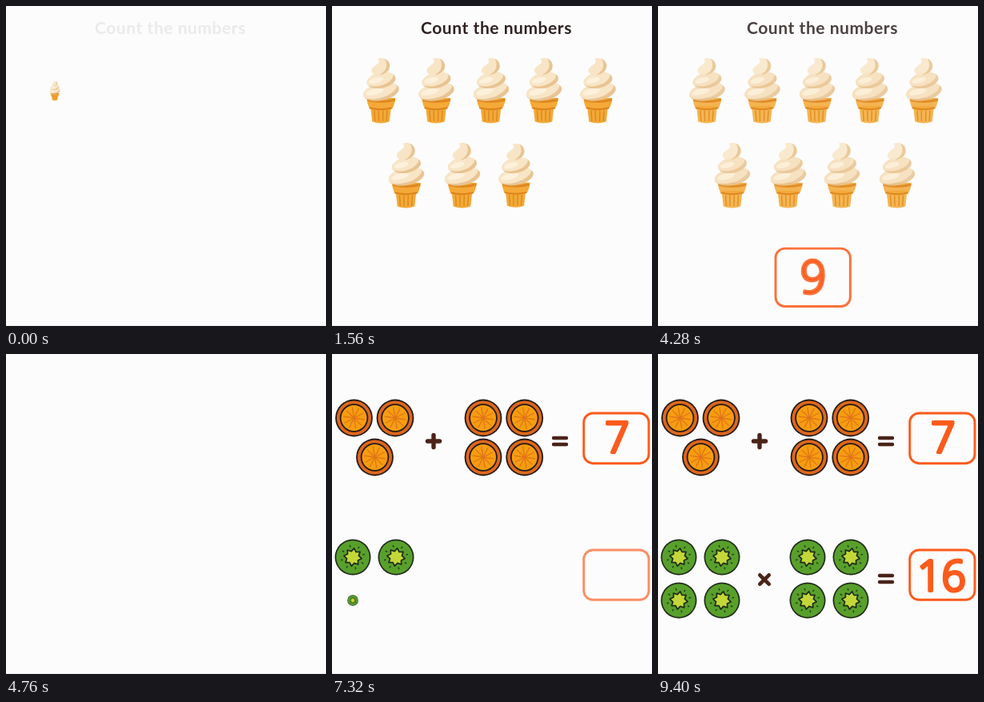
An HTML page with a canvas that plays this animation: 400x400 px, repeating every 10000 ms.

```html
<!DOCTYPE html>
<html lang="en">
<head>
<meta charset="utf-8">
<title>Count the numbers</title>
<style>
html, body { margin: 0; width: 100%; height: 100%; overflow: hidden; background: #fcfcfc; }
canvas { display: block; width: 100vw; height: 100vh; }
</style>
</head>
<body>
<canvas id="stage"></canvas>
<script>
const LOOP = 10000, STEP = 40, STAGGER = 200, POP = 165;
const ACCENT = '#fb5b1c', INK = '#2f2121', SIGN = '#4a2318', PAPER = '#fcfcfc';
const canvas = document.getElementById('stage');
const g = canvas.getContext('2d');
const dpr = window.devicePixelRatio || 1;
canvas.width = canvas.height = 400 * dpr;

const ramp = (t, a, b) => Math.max(0, Math.min(1, (t - a) / (b - a)));

function fill(color, trace) {
  g.beginPath();
  trace();
  g.fillStyle = color;
  g.fill();
}

function stroke(color, width, trace) {
  g.beginPath();
  trace();
  g.strokeStyle = color;
  g.lineWidth = width;
  g.stroke();
}

function line(x1, y1, x2, y2) {
  g.moveTo(x1, y1);
  g.lineTo(x2, y2);
}

const circle = r => () => g.arc(0, 0, r, 0, Math.PI * 2);

function fade(alpha, draw) {
  if (alpha <= 0) return;
  g.save();
  g.globalAlpha *= alpha;
  draw();
  g.restore();
}

// Grows from 30% to full size; shift moves the drawing off the scaling origin.
function pop(t, start, x, y, draw, shift = 0) {
  if (t < start) return;
  const s = 0.3 + 0.7 * ramp(t, start, start + POP);
  g.save();
  g.translate(x - shift, y);
  g.scale(s, s);
  g.translate(shift, 0);
  draw();
  g.restore();
}

function popAll(t, start, spots, draw) {
  spots.forEach(([x, y], i) => pop(t, start + i * STAGGER, x, y, draw));
}

function tier(x, y, rx, ry) {
  g.save();
  g.beginPath();
  g.ellipse(x, y, rx, ry, -0.2, 0, Math.PI * 2);
  g.fillStyle = '#e8c492';
  g.fill();
  g.clip();
  fill('#f8e5c6', () => g.ellipse(x - 2.5, y - 3, rx, ry, -0.28, 0, Math.PI * 2));
  fill('#fdf1dc', () => g.ellipse(x - rx * 0.35, y, rx * 0.5, ry * 0.35, -0.25, 0, Math.PI * 2));
  g.restore();
}

function cone() {
  fill('#f3a936', () => {
    g.moveTo(-13, 19);
    g.lineTo(13, 19);
    g.lineTo(10.8, 38.5);
    g.quadraticCurveTo(0, 42.5, -10.8, 38.5);
  });
  for (const x of [-8, -2.8, 2.8, 8]) stroke('#dc8a22', 1.5, () => line(x, 25, x * 0.9, 37.5));
  fill('#f4a938', () => {
    g.moveTo(-17.5, 9);
    g.lineTo(18.5, 9);
    g.quadraticCurveTo(17.5, 17, 14.5, 22);
    g.quadraticCurveTo(0, 25.5, -14, 22);
    g.quadraticCurveTo(-17, 17, -17.5, 9);
  });
  stroke('#dc8118', 1.9, () => {
    g.moveTo(-13.5, 21.5);
    g.quadraticCurveTo(0, 25, 13.5, 21.5);
  });
  stroke('#e0881f', 3, () => {
    g.moveTo(-15.5, 11.5);
    g.quadraticCurveTo(0, 15.5, 16.5, 11.5);
  });
  tier(0.5, 1.2, 22.6, 10.8);
  tier(0.5, -13, 18.2, 9.6);
  fill('#f8e5c6', () => {
    g.moveTo(-4, -40);
    g.bezierCurveTo(4, -43, 11.5, -38, 11.5, -31);
    g.bezierCurveTo(11.5, -24, 5, -19.5, -2, -19.5);
    g.bezierCurveTo(-11, -19.5, -14, -25, -10, -29);
    g.bezierCurveTo(-6, -33, 1, -35, -4, -40);
  });
  fill('#e8c492', () => {
    g.moveTo(5, -40);
    g.bezierCurveTo(14, -36, 14, -22, -2, -19.5);
    g.bezierCurveTo(8, -25, 9, -33, 5, -40);
  });
}

function orange() {
  fill('#251a17', circle(23.4));
  fill('#dd681c', circle(21.6));
  fill('#251a17', circle(17.8));
  fill('#f69d10', circle(16));
  for (let i = 0; i < 10; i++) {
    const a = i * Math.PI / 5 + 0.15;
    stroke('#e0741a', 1.3, () => line(0, 0, 13 * Math.cos(a), 13 * Math.sin(a)));
  }
}

function kiwi() {
  fill('#1f2a1a', circle(22.5));
  fill('#58a02b', circle(20.8));
  const star = () => {
    for (let i = 0; i < 16; i++) {
      const a = i * Math.PI / 8 + 0.15, r = i % 2 ? 7.6 : 11.2;
      g.lineTo(r * Math.cos(a), r * Math.sin(a));
    }
    g.closePath();
  };
  fill('#c3d838', star);
  stroke('#1f2a1a', 1.7, star);
  for (let i = 0; i < 8; i++) {
    const a = (i + 0.5) * Math.PI / 4 + 0.15;
    stroke('#24401a', 1.6, () =>
      line(13.5 * Math.cos(a), 13.5 * Math.sin(a), 14.8 * Math.cos(a), 14.8 * Math.sin(a)));
  }
}

const plus = () => stroke(SIGN, 5.4, () => { line(-7.5, 0, 7.5, 0); line(0, -7.5, 0, 7.5); });
const times = () => stroke(SIGN, 4.6, () => { line(-5.7, -5.7, 5.7, 5.7); line(-5.7, 5.7, 5.7, -5.7); });
const equals = () => stroke(SIGN, 4.4, () => { line(-8, -4, 8, -4); line(-8, 4, 8, 4); });

function frame(x, y, w, h) {
  stroke(ACCENT, 2.9, () => g.roundRect(x, y, w, h, 11.5));
}

// A light face with a thick round outline gives soft stroke ends.
function answer(text, x, y, size) {
  g.font = `300 ${size}px "Open Sans", sans-serif`;
  g.fillStyle = g.strokeStyle = ACCENT;
  g.lineWidth = 4.2;
  g.fillText(text, x, y);
  g.strokeText(text, x, y);
}

function heading() {
  g.font = '700 21px Lato, sans-serif';
  g.letterSpacing = '0.55px';
  g.fillStyle = INK;
  g.fillText('Count the numbers', 205.5, 34.5);
}

const grid = (x, y, dx, dy) => [[x, y], [x + dx, y], [x, y + dy], [x + dx, y + dy]];
const cones = [
  ...[61, 130, 198.5, 264.5, 332].map(x => [x, 106]),
  ...[92.5, 162.5, 229.5, 298.5].map(x => [x, 212])
];

function counting(t) {
  fade(1 - ramp(t, 4200, 4760), () => {
    fade(ramp(t, -20, 220), heading);
    popAll(t, 0, cones, cone);
    fade(ramp(t, 1780, 2440), () => frame(147, 303.1, 93.3, 72.4));
    fade(ramp(t, 3020, 3200), () => answer('9', 194, 359, 57));
  });
}

function sums(t) {
  popAll(t, 5120, [[27.5, 80], [79, 80], [53.5, 129]], orange);
  popAll(t, 5120, grid(189, 80, 51.7, 49), orange);
  pop(t, 5120, 127, 109, plus, 20);
  pop(t, 5120, 285, 109, equals, 20);
  fade(ramp(t, 5100, 5720), () => frame(314.7, 74, 81.3, 62.7));
  fade(ramp(t, 6500, 6720), () => answer('7', 356.5, 123, 53));

  popAll(t, 6920, grid(26, 254, 54, 54), kiwi);
  popAll(t, 7720, grid(187, 254, 54, 54), kiwi);
  pop(t, 7720, 133, 282, times, 20);
  pop(t, 8400, 285, 281, equals, 20);
  fade(ramp(t, 6900, 7520), () => frame(314.7, 245, 81.3, 62.3));
  fade(ramp(t, 9220, 9400), () => answer('16', 354.5, 295.5, 53));
}

function render(t) {
  g.setTransform(dpr, 0, 0, dpr, 0, 0);
  g.fillStyle = PAPER;
  g.fillRect(0, 0, 400, 400);
  g.fillStyle = '#ececec';
  g.fillRect(0, 399, 400, 1);
  g.lineCap = g.lineJoin = 'round';
  g.textAlign = 'center';
  g.letterSpacing = '0px';
  if (t < 4760) counting(t);
  else sums(t);
}

const origin = performance.now();
function tick() {
  const t = (performance.now() - origin) % LOOP;
  render(Math.floor(t / STEP) * STEP);
  requestAnimationFrame(tick);
}
tick();
</script>
</body>
</html>
```
